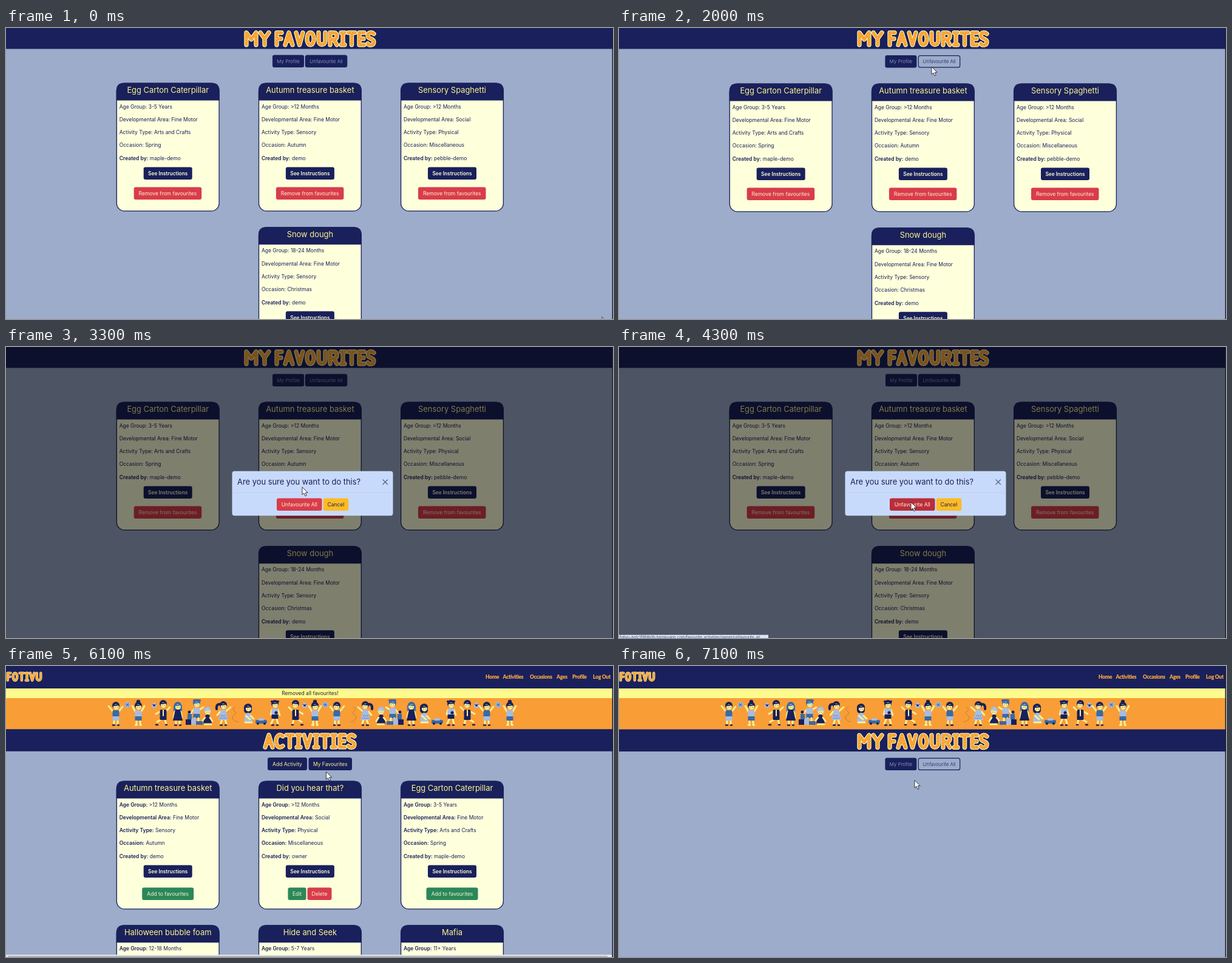
Animation of 1000x480 px, one loop 7.2 s. Source, as an HTML page:

```html
<!DOCTYPE html>
<html lang="en">
<head>
<meta charset="utf-8">
<style>
html, body { margin: 0; width: 100%; height: 100%; overflow: hidden; background: #9cacca; }
svg { display: block; width: 100%; height: 100%; font-family: Inter, "Open Sans", sans-serif; }
</style>
</head>
<body>
<svg id="stage" viewBox="0 0 1000 480"></svg>
<script>
const LOOP = 7200;
const NAVY = '#19205b', SKY = '#9cacca', CREAM = '#feffdb', LEMON = '#fdf58f';
const RED = '#d93c4b', GREEN = '#2b8759', ORANGE = '#f99d36', SKIN = '#f9f096';
const BLUE = '#3a69a6', PALE = '#a9bbdf';

const rect = (x, y, w, h, fill, r = 0, extra = '') =>
  `<rect x="${x}" y="${y}" width="${w}" height="${h}" rx="${r}" fill="${fill}" ${extra}/>`;
const dot = (x, y, r, fill) => `<circle cx="${x}" cy="${y}" r="${r}" fill="${fill}"/>`;
const line = (d, stroke, w, extra = '') =>
  `<path d="${d}" fill="none" stroke="${stroke}" stroke-width="${w}" stroke-linecap="round" stroke-linejoin="round" ${extra}/>`;
// y is the vertical middle of the capitals
const text = (x, y, s, size, fill, extra = '') =>
  `<text x="${x}" y="${y + size * 0.36}" font-size="${size}" fill="${fill}" ${extra}>${s}</text>`;
const mid = (x, y, s, size, fill, extra = '') => text(x, y, s, size, fill, 'text-anchor="middle" ' + extra);
const button = (x, y, w, h, label, fill, color, extra = '', size = 8.5) =>
  rect(x, y, w, h, fill, 3) + mid(x + w / 2, y + h / 2, label, size, color, extra);
const hoverButton = (id, x, y, w, h, label, size, color, extra = '') =>
  `<g id="${id}">` + rect(x + 0.6, y + 0.6, w - 1.2, h - 1.2, NAVY, 3, `stroke="${NAVY}" stroke-width="1.2"`) +
  mid(x + w / 2, y + h / 2, label, size, color, extra) + '</g>';

// Display lettering: advance width and skeleton path
const GLYPHS = {
  M: [24, 'M4 21V1L12 12 20 1V21'],
  Y: [20, 'M3 1L10 11 17 1M10 11V21'],
  F: [15, 'M4 21V1H12M4 11H11'],
  A: [18, 'M3 21L9 1 15 21M5 14H13'],
  V: [17, 'M3 1L8.5 21 14 1'],
  O: [19, 'M9.5 1C2 1 2 21 9.5 21S17 1 9.5 1Z'],
  U: [19, 'M4 1V14C4 23 15 23 15 14V1'],
  R: [19, 'M4 21V1H10C17 1 17 12 10 12H4M10 12L15 21'],
  I: [12, 'M3 1H9M6 1V21M3 21H9'],
  T: [17, 'M3 1H14M8.5 1V21'],
  E: [15, 'M12 1H4V21H12M4 11H11'],
  S: [16, 'M13 3C9-1 3 1 3 6C3 12 13 10 13 16C13 22 6 23 3 19'],
  C: [17, 'M14 3C8-2 3 3 3 11S8 24 14 19'],
  ' ': [6, '']
};
function lettering(s, cx, y, scale = 1) {
  const glyphs = [...s].map(c => GLYPHS[c]);
  let x = 0;
  const placed = glyphs.map(([w, d]) => { x += w; return [x - w, d]; });
  const layer = (color, w, extra) => placed.map(([gx, d]) =>
    `<g transform="translate(${gx} 0)">${line(d, color, w, extra)}</g>`).join('');
  return `<g transform="translate(${cx - x * scale / 2} ${y}) scale(${scale})">` +
    layer('#fdf0b4', 7.4) + layer('#f8a02d', 4.9) + layer('#fdeeb0', 1, 'stroke-dasharray=".2 4.5"') + '</g>';
}
const band = (y, title) => rect(0, y, 1000, 36.5, NAVY) + lettering(title, 500.5, y + 8.7);

// Playing children, drawn around x = 0
const head = (y, hair) => dot(0, y - 1, 6, hair) + dot(0.4, y + 1.4, 4.5, SKIN) +
  line(`M-4 ${y - 1}Q1 ${y - 1} 4 ${y - 2}`, hair, 2.2) + dot(-1.2, y + 2, 0.6, NAVY) + dot(2.2, y + 2, 0.6, NAVY);
const body = (top, shirt, pants) => rect(-5.5, top, 11, 11, shirt, 2) + rect(-5.5, top + 10, 11, 7, pants, 1);
const legs = (d = 'M-3 90V96M3 90V96') => line(d, SKIN, 3);
const shoes = (color, a = -4, b = 4, y = 97.5) => line(`M${a - 1} ${y}h3M${b - 1} ${y}h2`, color, 2.4);
const arms = d => line(d, SKIN, 2.8);
const ball = (x, y) => dot(x, y, 4.4, PALE) + dot(x, y, 1.8, NAVY) + line(`M${x - 3} ${y - 2}l1 1M${x + 3} ${y - 2}l-1 1`, NAVY, 1);
const star = (x, y) => dot(x, y, 4.8, PALE) + line(`M${x - 3} ${y}h6M${x - 2} ${y - 3}l4 6M${x + 2} ${y - 3}l-4 6`, BLUE, 1);
const kids = {
  wave: star(19, 64) + arms('M-5 75L-12 66M5 75L11 67') + legs() + body(73, BLUE, PALE) + head(66, NAVY) + shoes(NAVY),
  bun: dot(0, 59, 3.2, NAVY) + arms('M-5 75L-10 66M5 75L10 66') + legs() + body(73, PALE, BLUE) + head(66, NAVY) + shoes(SKIN),
  kick: ball(-15, 65) + arms('M-5 75L-12 79M5 74L11 68') + legs('M-3 88L-10 92M3 88L5 97') + body(72, NAVY, NAVY) +
    line('M0 73V82', SKIN, 2) + head(63, NAVY) + shoes(NAVY, -11, 5, 97),
  girl: rect(-7, 62, 14, 17, BLUE, 5) + arms('M-5 75L-7 85M5 75L7 85') + legs() +
    `<path d="M-4 72H4L8 90H-8Z" fill="${NAVY}"/>` + head(66, BLUE) + shoes(NAVY),
  builder: arms('M-5 72L-10 79M5 72L11 68') + body(69, PALE, BLUE) + legs('M-3 86V96M3 86V96') + head(62, BLUE) +
    rect(-6, 55, 13, 4, BLUE, 2) + rect(-18, 88, 9, 9, NAVY) + rect(-9, 86, 8, 11, PALE) + rect(-1, 91, 11, 6, BLUE) +
    rect(-15, 79, 7, 9, BLUE) + dot(-12, 76, 2.5, NAVY),
  sit: `<path d="M-7 97Q-6 80 0 80T7 97Z" fill="${NAVY}"/>` + arms('M-4 85L-8 90M4 85L8 91') + legs('M-5 96H6') + head(74, PALE),
  pony: line('M20 68q-7 2-2 6t0 7-2 7 8 4', '#be7d3d', 1) + line('M-5 63Q-12 62-11 71', NAVY, 4) + arms('M4 75L12 68M-5 75L-10 81') +
    legs('M-2 88L-5 97M3 88L5 95') + `<path d="M-4 72H4L8 89H-8Z" fill="${PALE}"/>` +
    line('M-4 82h8M-5 86h10', BLUE, 1, 'stroke-dasharray="1 2"') + head(65, NAVY) + shoes(NAVY),
  play: rect(-7, 63, 13, 15, NAVY, 5) + `<path d="M-7 92Q-6 77 0 77T7 92Z" fill="${PALE}"/>` + arms('M-4 82L3 88M4 82L9 87') +
    legs('M-5 93H6') + head(69, NAVY) + rect(12, 89, 19, 6, BLUE, 2) + rect(17, 86, 9, 4, PALE, 1) + dot(16, 95, 2, NAVY) + dot(27, 95, 2, NAVY),
  cap: arms('M-5 72L-7 80L2 82M5 72L8 81') + legs('M-3 88L-6 95M3 88L5 95') + body(70, PALE, NAVY) + dot(2, 77, 2.5, NAVY) +
    head(63, NAVY) + rect(-7, 57, 14, 3, NAVY, 1) + shoes(NAVY)
};
const parade = [['wave', 181], ['bun', 218], ['kick', 259], ['girl', 283], ['builder', 314], ['sit', 332], ['pony', 358],
  ['play', 399], ['cap', 443], ['kick', 477, 1], ['bun', 509], ['wave', 545, 1], ['pony', 592, 1], ['sit', 618, 1],
  ['builder', 637, 1], ['girl', 668, 1], ['play', 689], ['cap', 733], ['kick', 760, 1], ['wave', 792], ['bun', 830]]
  .map(([kind, x, flip]) => `<g transform="translate(${x} 0) scale(${flip ? -1 : 1} 1)">${kids[kind]}</g>`).join('');

const nav = [['Home', 790], ['Activities', 818.5], ['Occasions', 863], ['Ages', 907], ['Profile', 933], ['Log Out', 967]]
  .map(([s, x]) => text(x, 17.5, s, 8.6, '#fba93d', 'font-family="Lato, sans-serif" font-weight="900" letter-spacing="-.3"')).join('');

// Activity cards
const LABELS = ['Age Group:', 'Developmental Area:', 'Activity Type:', 'Occasion:', 'Created by:'];
function card(x, y, [title, ...values], allBold) {
  const rows = values.map((v, i) => text(x + 5, y + 39 + i * 21.3,
    `<tspan font-weight="${allBold || i === 4 ? 600 : 400}">${LABELS[i]}</tspan> ${v}`, 8.5, NAVY)).join('');
  return rect(x + 0.6, y + 0.6, 168.8, 210.8, CREAM, 13, `stroke="${NAVY}" stroke-width="1.3"`) +
    `<path d="M${x} ${y + 29}v-16q0-13 13-13h144q13 0 13 13v16z" fill="${NAVY}"/>` +
    mid(x + 85, y + 12, title, 12.9, LEMON) + rows +
    button(x + 45, y + 139, 80, 20.5, 'See Instructions', NAVY, CREAM, 'font-weight="600"', 8.3);
}
const COLS = [181.7, 415.9, 650];
const caterpillar = ['Egg Carton Caterpillar', '3-5 Years', 'Fine Motor', 'Arts and Crafts', 'Spring', 'maple-demo'];
const basket = ['Autumn treasure basket', '>12 Months', 'Fine Motor', 'Sensory', 'Autumn', 'demo'];
const spaghetti = ['Sensory Spaghetti', '>12 Months', 'Social', 'Physical', 'Miscellaneous', 'pebble-demo'];
const dough = ['Snow dough', '18-24 Months', 'Fine Motor', 'Sensory', 'Christmas', 'demo'];
const hearing = ['Did you hear that?', '>12 Months', 'Social', 'Physical', 'Miscellaneous', 'owner'];

const favourite = (x, y, data) => card(x, y, data) +
  button(x + 29, y + 172, 111.5, 20.5, 'Remove from favourites', RED, '#fdf3d0');
const addable = (x, y, data) => card(x, y, data, true) +
  button(x + 42.5, y + 176, 85, 20.5, 'Add to favourites', GREEN, '#f4f8d8');

const favourites = '<g id="fav">' + band(-2, 'MY FAVOURITES') +
  '<g id="profile">' + button(439, 44.5, 52, 20.5, 'My Profile', NAVY, SKY, 'font-weight="300"', 8) + '</g>' +
  hoverButton('unfav', 492.7, 44.5, 69.6, 20.5, 'Unfavourite All', 8, SKY, 'font-weight="300"') +
  '<g id="favCards">' + favourite(COLS[0], 90.5, caterpillar) + favourite(COLS[1], 90.5, basket) +
  favourite(COLS[2], 90.5, spaghetti) + favourite(COLS[1], 328.3, dough) + '</g></g>';

const site = '<g id="site">' + rect(0, 0, 1000, 37, NAVY) + lettering('FOTIVU', 30, 11, 0.6) + nav +
  rect(0, 37, 1000, 16, '#fdfb8d') + rect(0, 53, 1000, 51.5, ORANGE) + parade + '</g>';

const activities = '<g id="act">' + mid(501, 45, 'Removed all favourites!', 8.5, '#22253f') + band(104.2, 'ACTIVITIES') +
  button(431, 151, 65, 21, 'Add Activity', NAVY, LEMON) +
  hoverButton('myFav', 498.5, 151, 71.5, 21, 'My Favourites', 8.5, LEMON) +
  '<g id="actCards">' + addable(COLS[0], 189.5, basket) + card(COLS[1], 189.5, hearing, true) +
  button(464.5, 365.5, 30, 20.5, 'Edit', GREEN, '#f4f8d8') + button(496.5, 365.5, 40, 20.5, 'Delete', RED, '#fdf3d0') +
  addable(COLS[2], 189.5, caterpillar) + card(COLS[0], 427.3, ['Halloween bubble foam', '12-18 Months'], true) +
  card(COLS[1], 427.3, ['Hide and Seek', '5-7 Years'], true) + card(COLS[2], 427.3, ['Mafia', '11+ Years'], true) + '</g>' +
  rect(0, 476.3, 998, 4, '#e9eaec') + rect(3, 478, 988, 2, '#b4b5ba', 1) + '</g>';

const modal = `<g id="modal">` + rect(372.5, 204.7, 265, 73.5, '#c8dafb', 4) +
  text(381, 222, 'Are you sure you want to do this?', 12.9, NAVY) +
  line('M373 240.3H637', '#bccfee', 0.8) + line('M621 219l7.5 7.5M628.5 219l-7.5 7.5', '#5b657f', 1.3) +
  `<g id="confirm">${button(446, 249.5, 74.5, 20.5, 'Unfavourite All', RED, '#fdf3d0')}</g>` +
  button(522.7, 249.5, 41.5, 20.5, 'Cancel', '#fdbb24', NAVY) + '</g>';

const stage = document.getElementById('stage');
stage.innerHTML = rect(0, 0, 1000, 480, SKY) + site + favourites + activities +
  `<g id="shade">${rect(0, 0, 1000, 480, '#000')}</g>` + modal + rect(998.6, 0, 1.4, 480, '#1d2030') +
  '<g id="status">' + rect(0, 474.8, 246, 6, '#dbe4f6') +
  text(1, 479.2, 'fotivu-ba1c1f9fdb0b.herokuapp.com/favourite_activities/owner/unfavourite_all', 6.3, '#3c4a6e') + '</g>' +
  `<path id="cursor" d="M0 0V12.6L3 10 5 14.8 7.2 13.8 5.2 9.2H9.2Z" fill="#fff" stroke="#20242f" stroke-width=".9" stroke-linejoin="round"/>`;

const $ = id => document.getElementById(id);
const show = (id, on) => $(id).setAttribute('display', on ? 'inline' : 'none');
const move = (id, x, y) => $(id).setAttribute('transform', `translate(${x} ${y})`);
const ramp = (t, start, length) => Math.min(1, Math.max(0, (t - start) / length));

function setHover(id, k, color) {
  const [box, label] = $(id).children;
  box.setAttribute('fill-opacity', 1 - k);
  label.setAttribute('fill', k > 0.5 ? NAVY : color);
}

// [time, x, y] of the pointer tip
const TRACK = [[0, 982, 476.5], [100, 982, 476.5], [900, 516, 70], [1150, 515, 64], [2400, 515, 64], [3300, 488, 231],
  [3700, 481, 256], [5650, 481, 256], [6100, 527.5, 174.5], [6300, 525, 163], [6600, 525, 163], [7100, 487, 188.5], [LOOP, 487, 188.5]];
function pointer(t) {
  const i = TRACK.findIndex(p => p[0] > t);
  const [t0, x0, y0] = TRACK[i - 1], [t1, x1, y1] = TRACK[i];
  const u = (t - t0) / (t1 - t0), k = u * u * (3 - 2 * u);
  return [x0 + (x1 - x0) * k, y0 + (y1 - y0) * k];
}

function render(t) {
  const start = t < 4500, empty = t >= 6600, listing = !start && !empty;
  show('site', !start);
  show('fav', !listing);
  show('act', listing);
  show('favCards', start);
  move('fav', 0, empty ? 106.5 : 0);

  const over = empty || (t >= 1000 && t < 2150);
  setHover('unfav', empty ? 1 : ramp(t, 1000, 150) * (1 - ramp(t, 2150, 150)), SKY);
  move('profile', over ? -0.6 : 0, over ? 0.5 : 0);
  move('unfav', 0, over ? 0.5 : 0);
  move('favCards', 0, over ? 1 : 0);

  const overList = t >= 6180;
  setHover('myFav', ramp(t, 6180, 150), LEMON);
  move('myFav', 0, overList ? 0.5 : 0);
  move('actCards', 0, overList ? 1 : 0);

  const open = start && t >= 2150;
  show('shade', open);
  show('modal', open);
  $('shade').setAttribute('opacity', 0.5 * ramp(t, 2150, 150));
  $('modal').setAttribute('opacity', ramp(t, 2250, 150));
  move('modal', 0, -26 * (1 - ramp(t, 2250, 300)) ** 2);
  $('confirm').firstChild.setAttribute('fill', t >= 3600 ? '#bb2d3b' : RED);

  show('status', t >= 3650 && t < 5000);
  show('cursor', start || t >= 5700);
  move('cursor', ...pointer(t));
}

function tick() {
  render(performance.now() % LOOP);
  requestAnimationFrame(tick);
}
tick();
</script>
</body>
</html>
```
